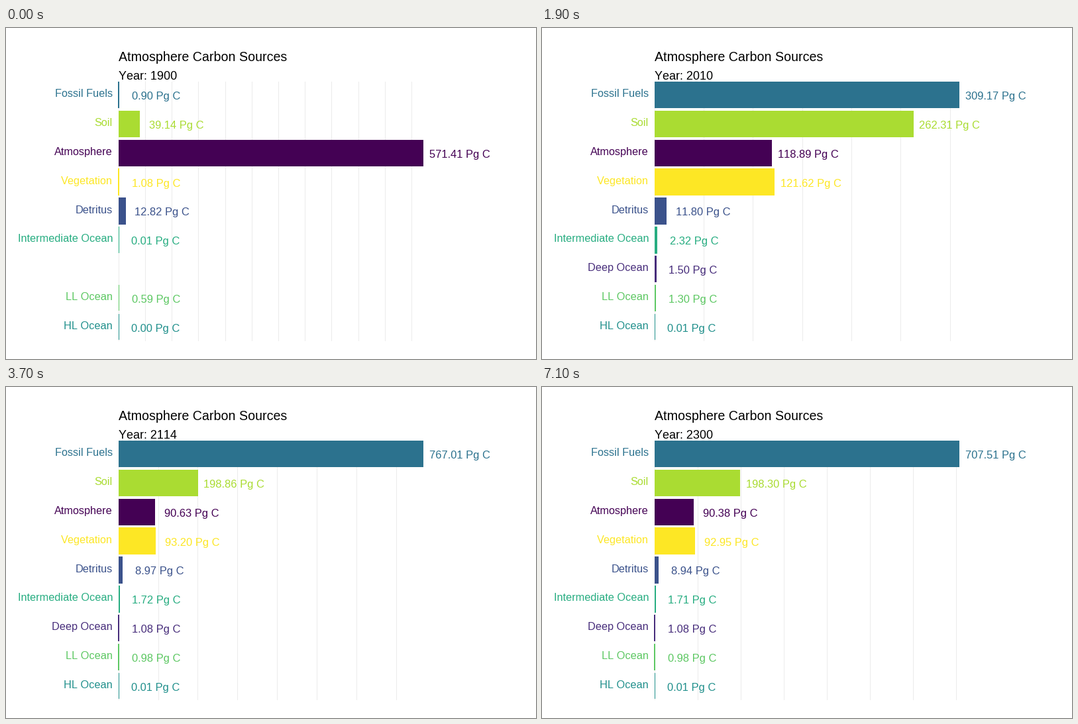
A matplotlib script that plays this animation: 800 by 500 pixels, repeating every 10 s.

```python
import math

import matplotlib.pyplot as plt
import numpy as np
from matplotlib.animation import FuncAnimation
from matplotlib.collections import LineCollection
from matplotlib.patches import Rectangle

W, H, DPI = 800, 500, 100
LEFT, SPAN = 170.08, 459.84          # panel start and width in pixels
TOP, BOTTOM, ROW = 81, 472, 43.87
FRAMES, STEPS = 100, 69
FAST, SLOW = 9, 22                   # mixing times of the carbon pools, years

# name, colour, Pg C in 1900, 1958 and 2300
POOLS = [
    ("Soil", "#AADC32", 39.14, 334.89, 198.30),
    ("Atmosphere", "#440154", 571.41, 145.00, 90.38),
    ("Vegetation", "#FDE725", 1.08, 139.76, 92.95),
    ("Detritus", "#3B528B", 12.82, 14.82, 8.94),
    ("Intermediate Ocean", "#27AD81", 0.01, 3.57, 1.71),
    ("Deep Ocean", "#472D7B", 0, 2.76, 1.08),
    ("LL Ocean", "#5DC863", 0.59, 1.66, 0.98),
    ("HL Ocean", "#21908C", 0.001, 0.02, 0.01),
]
ROWS = [("Fossil Fuels", "#2C728E")] + [p[:2] for p in POOLS]


def smooth_curve(x, y):
    """Cubic through key points that never overshoots them."""
    x, y = np.array(x, float), np.array(y, float)
    d = np.diff(y) / np.diff(x)
    a, b = d[:-1], d[1:]
    same = a * b > 0
    inner = np.where(same, 2 * a * b / np.where(same, a + b, 1), 0)
    m = np.concatenate([d[:1], inner, d[-1:]])

    def curve(t):
        i = int(np.clip(np.searchsorted(x, t, "right") - 1, 0, len(x) - 2))
        h = x[i + 1] - x[i]
        u = (t - x[i]) / h
        return ((1 + 2 * u) * (1 - u) ** 2 * y[i] + u * (1 - u) ** 2 * h * m[i]
                + u * u * (3 - 2 * u) * y[i + 1] + u * u * (u - 1) * h * m[i + 1])

    return curve


KEY_YEARS = [1900, 1958, 2010, 2074, 2161, 2242, 2300]
fossil = smooth_curve(KEY_YEARS,
                      [0.90, 29.11, 309.17, 796.06, 730.01, 741.83, 707.51])
natural = smooth_curve(KEY_YEARS,
                       [625.05, 642.48, 519.75, 378.28, 417.32, 411.59, 394.35])

# Each pool's share of the natural carbon relaxes to its final level.
amounts = np.array([p[2:] for p in POOLS])
first, middle, final = (amounts / amounts.sum(axis=0)).T
fast_mid, slow_mid = math.exp(-58 / FAST), math.exp(-58 / SLOW)
slow_part = ((middle - final - (first - final) * fast_mid)
             / (slow_mid - fast_mid))
fast_part = first - final - slow_part


def values_at(year):
    t = year - 1900
    share = (final + slow_part * math.exp(-t / SLOW)
             + fast_part * math.exp(-t / FAST))
    return np.append(fossil(year), natural(year) * share.clip(0))


def grid_step(top):
    if top < 271:
        return 25
    return 50 if top < 605 else 100


plt.rcParams["font.family"] = "Liberation Sans"
plt.rcParams["text.kerning_factor"] = 6      # no kerning
fig = plt.figure(figsize=(W / DPI, H / DPI), dpi=DPI, facecolor="white")
ax = fig.add_axes([0, 0, 1, 1])
ax.set_xlim(0, W)
ax.set_ylim(H, 0)
ax.axis("off")


def put(x, y, text, px, color="black", ha="left"):
    return ax.text(x, y, text, fontsize=px * 72 / DPI, color=color,
                   ha=ha, va="baseline", zorder=3)


put(170, 50, "Atmosphere Carbon Sources", 19.7)
year_text = put(170, 78, "", 18)

grid = LineCollection([], colors="#EBEBEB", linewidths=72 / DPI,
                      antialiaseds=False, zorder=1)
ax.add_collection(grid)

names, bars, labels = [], [], []
for n, (name, color) in enumerate(ROWS):
    names.append(put(161, round(104.1 + ROW * n), name, 16.2, color, "right"))
    labels.append(put(0, round(108 + ROW * n), "", 16.56, color))
    bars.append(ax.add_patch(Rectangle((0, 0), 1, 1, fc=color, lw=0,
                                       antialiased=False, zorder=2)))


def set_bar(bar, n, width):
    y0 = math.floor(81.3 + ROW * n)
    y1 = math.ceil(120.7 + ROW * n)
    x0, x1 = 170, math.ceil(LEFT + width - 0.01)
    if width < 0.5:                  # hairline
        x1, y1 = 171, y1 - 1
    elif x1 == 171:
        x0 = 169
    bar.set_bounds(x0, y0, x1 - x0, y1 - y0)


def draw(frame):
    year = round(1900 + 400 * min(frame, STEPS) / STEPS)
    vals = values_at(year)
    top = vals.max()
    scale = SPAN / top
    year_text.set_text(f"Year: {year}")

    xs = [math.floor(LEFT + v * scale)
          for v in np.arange(0, top, grid_step(top))]
    grid.set_segments([[(x, TOP), (x, BOTTOM)] for x in xs])

    for n, v in enumerate(vals):
        for part in (names[n], bars[n], labels[n]):
            part.set_visible(v > 1e-6)       # an empty pool has no row
        set_bar(bars[n], n, v * scale)
        number = f"{v:.2f}"
        blanks = 8 - len(number)
        labels[n].set_text(number + " Pg C")
        labels[n].set_x(LEFT + v * scale + 5 * blanks - 0.9)
    return [grid, year_text, *names, *bars, *labels]


anim = FuncAnimation(fig, draw, frames=FRAMES, interval=100, repeat=True)
plt.show()
```
